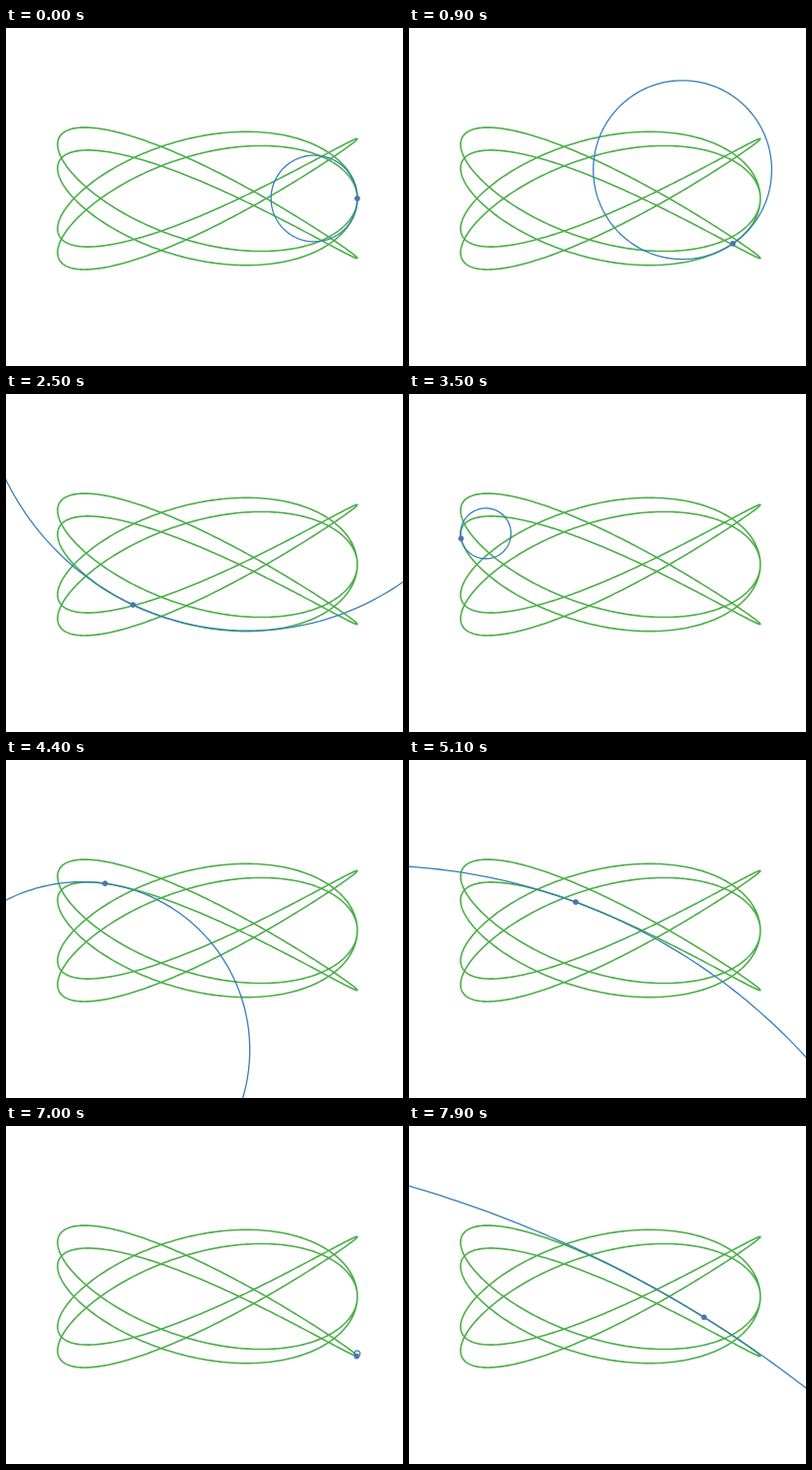
Recreate the animation shown at these times as an HTML page with a canvas. Size 400 by 340 pixels, loop 8000 ms.

```html
<!DOCTYPE html>
<html lang="en">
<head>
<meta charset="utf-8">
<title>Osculating circle</title>
<style>
html, body { margin: 0; width: 100%; height: 100%; overflow: hidden; background: #fff; }
canvas { display: block; width: 400px; height: 340px; }
</style>
</head>
<body>
<canvas id="stage"></canvas>
<script>
const W = 400, H = 340, STEP = 100, STEPS = 80;
const GREEN = '#4daf4a', BLUE = '#377eb8', PURPLE = '#6f62b2';
const { sin, cos, PI, hypot, min, abs } = Math;

const canvas = document.getElementById('stage');
const ctx = canvas.getContext('2d');
const ratio = window.devicePixelRatio || 1;
canvas.width = W * ratio;
canvas.height = H * ratio;
ctx.scale(ratio, ratio);
ctx.lineJoin = 'round';

// [step, curve parameter]; the pace is uneven
const pace = [
  [0, 0], [9, 0.154], [25, 0.5227], [35, 0.766], [45, 1.015],
  [51, 1.1196], [54, 1.18], [63, 1.418], [70, 1.5485], [79, 1.795]
];

function paramAt(step) {
  const i = pace.findIndex(([s]) => s >= step);
  if (i <= 0) return 0;
  const [s0, t0] = pace[i - 1], [s1, t1] = pace[i];
  return t0 + (t1 - t0) * (step - s0) / (s1 - s0);
}

const point = t => [203 + 151 * cos(4 * t), 171.5 + 60 * sin(5 * t) + 12 * sin(2 * t)];
const velocity = t => [-604 * sin(4 * t), 300 * cos(5 * t) + 24 * cos(2 * t)];
const acceleration = t => [-2416 * cos(4 * t), -1500 * sin(5 * t) - 48 * sin(2 * t)];

function strokePath(count, at, color, width) {
  ctx.beginPath();
  for (let i = 0; i <= count; i++) ctx.lineTo(...at(i / count));
  ctx.strokeStyle = color;
  ctx.lineWidth = width;
  ctx.stroke();
}

// Drawn outward from the contact point, so huge radii stay precise
function drawCircle(t) {
  const [x, y] = point(t), [vx, vy] = velocity(t), [ax, ay] = acceleration(t);
  const speed = hypot(vx, vy);
  const r = speed ** 3 / (vx * ay - vy * ax);
  const ux = vx / speed, uy = vy / speed;
  const reach = min(PI, 1000 / abs(r));
  strokePath(240, k => {
    const a = (2 * k - 1) * reach;
    const along = r * sin(a), across = 2 * r * sin(a / 2) ** 2;
    return [x + ux * along - uy * across, y + uy * along + ux * across];
  }, BLUE, 1.3);
}

function drawDot(t) {
  ctx.beginPath();
  ctx.arc(...point(t), 2.4, 0, 2 * PI);
  ctx.fillStyle = PURPLE;
  ctx.fill();
  ctx.strokeStyle = BLUE;
  ctx.lineWidth = 1;
  ctx.stroke();
}

function draw(step) {
  const t = paramAt(step);
  ctx.fillStyle = '#fff';
  ctx.fillRect(0, 0, W, H);
  strokePath(1200, k => point(2 * PI * k), GREEN, 1.6);
  drawCircle(t);
  drawDot(t);
}

const start = performance.now();
let shown = -1;
function tick() {
  const step = Math.floor((performance.now() - start) / STEP) % STEPS;
  if (step !== shown) draw(shown = step);
  requestAnimationFrame(tick);
}
tick();
</script>
</body>
</html>
```
